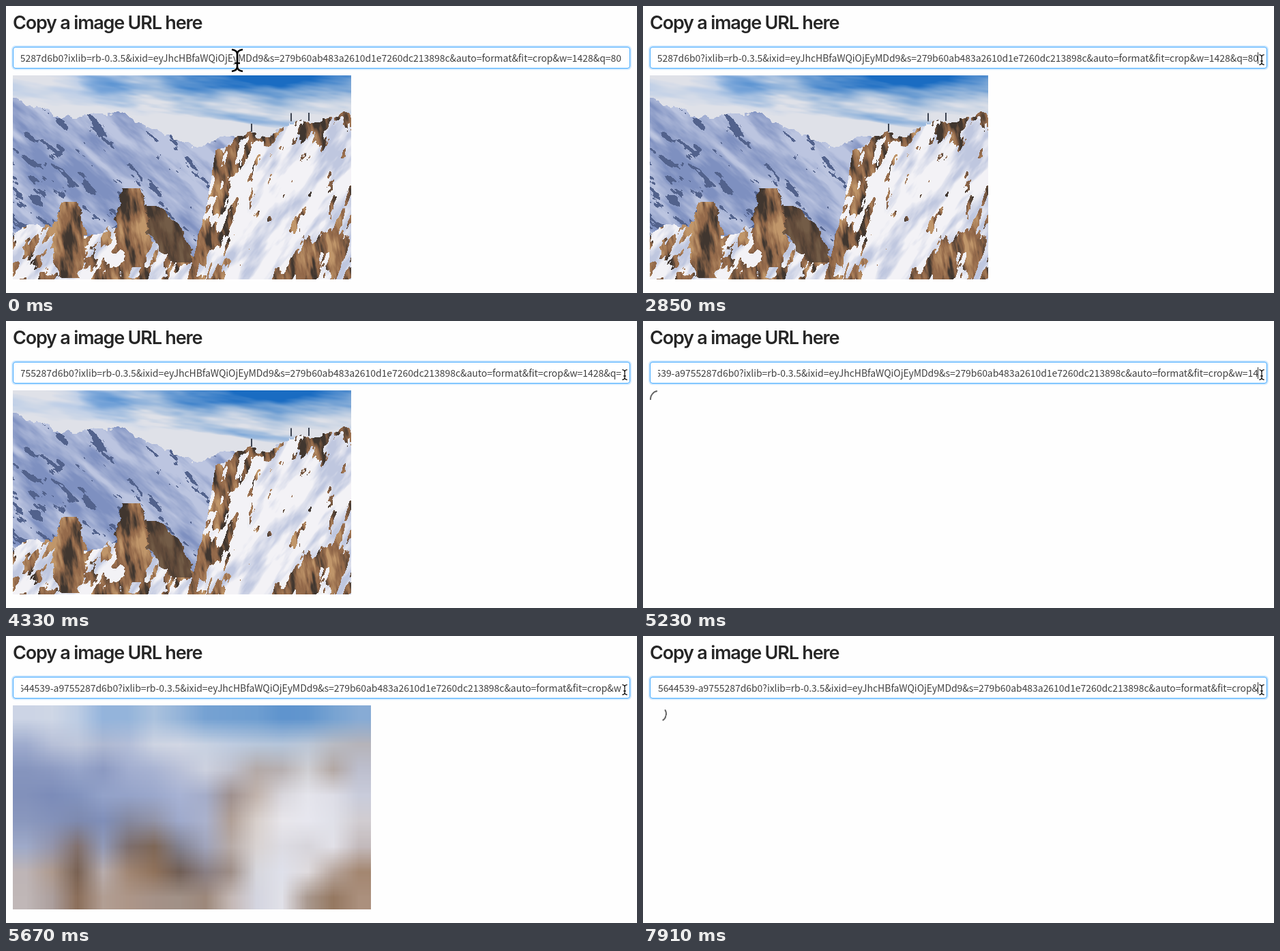
Write an HTML page with a canvas that moves like this. It is 925 by 422 pixels and loops after 8000 ms.

```html
<!DOCTYPE html>
<html lang="en">
<head>
<meta charset="utf-8">
<title>Image URL preview</title>
<style>
html, body { margin: 0; width: 100%; height: 100%; overflow: hidden; background: #fefefe; }
body > * { position: absolute; box-sizing: border-box; }
h1 { left: 10px; top: 5px; margin: 0; font: 600 27px/40px Inter, sans-serif; letter-spacing: -1.2px;
  color: rgba(0,0,0,.85); white-space: nowrap; }
#field { left: 10px; top: 60px; width: 905px; height: 32px; border: 1px solid #40a9ff; border-radius: 4px;
  background: #fff; box-shadow: 0 0 0 2px rgba(24,144,255,.2); }
#url { left: 22px; top: 60px; width: 880px; height: 32px; overflow: hidden; display: flex; justify-content: flex-end;
  font: 14px/32px "Noto Sans CJK SC", "Noto Sans CJK JP", "Noto Sans", sans-serif; letter-spacing: -.05px;
  color: rgba(0,0,0,.75); white-space: pre; }
#caret { left: 901px; top: 68px; width: 1px; height: 17px; background: #333; }
canvas { left: 10px; top: 102px; }
#spinner { left: 10px; top: 102px; width: 25px; height: 25px; border: 2px solid transparent;
  border-right-color: #666; border-radius: 50%; }
svg { left: 0; top: 0; }
</style>
</head>
<body>
<h1>Copy a image URL here</h1>
<div id="field"></div>
<div id="url"></div>
<div id="caret"></div>
<canvas id="photo" width="496" height="300"></canvas>
<canvas id="blur" width="525" height="300"></canvas>
<div id="spinner"></div>
<svg width="925" height="422" fill="none">
  <defs><path id="beam" d="M-8-16Q0-15 0-9Q0-15 8-16M0-10V10M-8 16Q0 15 0 9Q0 15 8 16M-4 4H4"/></defs>
  <g id="cursor">
    <use href="#beam" stroke="#fff" stroke-width="4.6"/>
    <use href="#beam" stroke="#000" stroke-width="2.6"/>
  </g>
</svg>
<script>
const $ = id => document.getElementById(id);
const TEXT = '5644539-a9755287d6b0?ixlib=rb-0.3.5&ixid=eyJhcHBfaWQiOjEyMDd9' +
  '&s=279b60ab483a2610d1e7260dc213898c&auto=format&fit=crop&w=1428&q=80';
const LOOP = 8000, STEP = 149.2;

const clamp = (v, lo = 0, hi = 1) => Math.min(hi, Math.max(lo, v));
const ease = (v, from, to) => {
  const u = clamp((v - from) / (to - from));
  return u * u * (3 - 2 * u);
};
const rgb = hex => [1, 3, 5].map(i => parseInt(hex.slice(i, i + 2), 16));
const mix = (a, b, f) => a.map((v, i) => v + (b[i] - v) * clamp(f));

// Value noise on a seeded lattice
let seed = 7;
const rand = () => (seed = seed * 16807 % 2147483647) / 2147483647;
const lattice = Float32Array.from({ length: 65536 }, rand);
const at = (x, y) => lattice[(x & 255) + (y & 255) * 256];

function noise(x, y) {
  const i = Math.floor(x), j = Math.floor(y), u = ease(x - i, 0, 1), v = ease(y - j, 0, 1);
  const top = at(i, j) + (at(i + 1, j) - at(i, j)) * u;
  const low = at(i, j + 1) + (at(i + 1, j + 1) - at(i, j + 1)) * u;
  return top + (low - top) * v;
}

function fbm(x, y) {
  let sum = 0;
  for (let o = 0, amp = .53; o < 4; o++, amp /= 2) sum += amp * noise(x * 2 ** o + o * 37, y * 2 ** o + o * 71);
  return sum;
}

const streak = (x, y, angle, long, wide) => {
  const c = Math.cos(angle), s = Math.sin(angle);
  return fbm((x * c + y * s) / long, (y * c - x * s) / wide);
};

const ridge = points => x => {
  const i = clamp(points.findIndex(p => p[0] > x), 1, points.length - 1);
  const [x0, y0] = points[i - 1], [x1, y1] = points[i];
  return y0 + (y1 - y0) * (x - x0) / (x1 - x0);
};
const backTop = ridge([[0, 31], [75, 64], [155, 53], [235, 92], [270, 106], [300, 92], [497, 110]]);
const nearTop = ridge([[0, 235], [30, 215], [100, 240], [150, 222], [262, 262], [497, 400]]);
const frontTop = ridge([[0, 400], [250, 320], [284, 190], [297, 112], [345, 84], [375, 92], [412, 66], [440, 70], [485, 55], [497, 62]]);

const PINNACLES = [
  { x: 83, top: 186, base: 297, half: 25, lean: 0, shade: 0 },
  { x: 173, top: 166, base: 281, half: 25, lean: 4, shade: 0 },
  { x: 203, top: 192, base: 274, half: 25, lean: 44, shade: .6 },
];
const [DARK, BROWN, TAN, SHADE, SNOW] = ['#40362f', '#93694a', '#c0966a', '#bfc7df', '#f3f2f6'].map(rgb);
const [SLOPE, PALE, CRAG, CLOUD, HAZE, BLUE] = ['#7e90c0', '#bcc5e0', '#52628c', '#dfe1e8', '#afc6e6', '#1a6cc2'].map(rgb);

function rock(x, y) {
  const v = streak(x, y, 1.4, 36, 9);
  return v < .5 ? mix(DARK, BROWN, (v - .3) / .17) : mix(BROWN, TAN, (v - .5) / .2);
}

const snow = (x, y) => mix(SHADE, SNOW, (streak(x, y, 2.2, 60, 18) - .28) / .25);

function sky(x, y) {
  const wisp = streak(x, y, .12, 130, 24);
  const blue = 1.1 - Math.hypot((x - 370) / 220, (y - 5) / 55) + (wisp - .5) * 1.6;
  return mix(mix(CLOUD, HAZE, (wisp - .35) * 3 - y / 120), BLUE, blue);
}

function slope(x, y, depth) {
  if (streak(x, y, .7, 24, 9) + clamp(depth / 140) * .13 > .72) return CRAG;
  return mix(SLOPE, PALE, (streak(x, y, .7, 60, 16) - .3) / .4 + .15 - depth / 600);
}

function front(x, y, depth) {
  const cliff = 1 - (x - 300 + (y - 110) * .22) / 58;
  const foot = (y - 300 + (x - 346) * .88) / 50;
  const crest = 1 - depth / (x > 405 ? 32 : 12);
  const bias = clamp(Math.max(cliff, foot, crest), -.2, .75);
  return streak(x, y, 1.9, 26, 9) + bias * .35 > .65 ? rock(x, y) : snow(x, y);
}

function landscape(x, y) {
  const rough = fbm(x / 10, y / 10) - .5;
  for (const p of PINNACLES) {
    const v = (y - p.top) / (p.base - p.top);
    if (v < 0 || v > 1) continue;
    const half = p.half * (.45 + .55 * Math.sin(Math.PI * v));
    if (Math.abs(x - p.x - p.lean * v + rough * 18) < half) return mix(rock(x, y), DARK, p.shade);
  }
  const shifted = y + rough * 16;
  if (shifted > frontTop(x)) return front(x, y, shifted - frontTop(x));
  if (shifted > nearTop(x)) return streak(x, y, 2.1, 20, 9) > .53 ? rock(x, y) : snow(x, y);
  if (shifted > backTop(x)) return slope(x, y, shifted - backTop(x));
  return sky(x, y);
}

function drawPhoto(canvas) {
  const c = canvas.getContext('2d'), { width, height } = canvas;
  const image = c.createImageData(width, height);
  for (let y = 0, i = 0; y < height; y++)
    for (let x = 0; x < width; x++, i += 4) image.data.set([...landscape(x, y), 255], i);
  c.putImageData(image, 0, 0);
  c.fillStyle = '#3d4350';
  for (const x of [349, 407, 433]) c.fillRect(x, frontTop(x) - 14, 2, 12);
}

// The photo shrunk to 14 pixels wide, then stretched
function drawBlur(canvas, photo) {
  const tiny = document.createElement('canvas');
  tiny.width = 14;
  tiny.height = 8;
  const small = tiny.getContext('2d'), c = canvas.getContext('2d');
  small.imageSmoothingQuality = 'high';
  small.drawImage(photo, 0, 0, 14, 8);
  c.drawImage(tiny, 0, 0, canvas.width, canvas.height);
}

const show = (id, on) => $(id).style.visibility = on ? 'visible' : 'hidden';

function render(time) {
  const k = Math.floor(time % LOOP / STEP), t = k * STEP;

  const gone = (k >= 23) + (k >= 25) + clamp(k - 30, 0, 9);
  $('url').textContent = TEXT.slice(0, TEXT.length - gone);
  show('caret', (t + 50) % 1060 >= 530);

  const photo = k < 23 || k >= 27 && k < 31, blur = k === 38;
  show('photo', photo);
  show('blur', blur);
  show('spinner', !photo && !blur);
  $('spinner').style.transform = `rotate(${(t - 3450) / 1105 * 360}deg)`;

  const across = ease(k, 1, 8), away = ease(k, 12, 17);
  const lift = Math.sin(Math.PI * ease(k, 1, 11)) ** 2;
  const x = 339 + 315 * across + 253 * away;
  const y = 80 - 4 * across + 3 * away - 15 * lift;
  $('cursor').setAttribute('transform', `translate(${x} ${y}) scale(${1 - .54 * ease(k, 17, 19)})`);
}

drawPhoto($('photo'));
drawBlur($('blur'), $('photo'));
const begin = performance.now();
(function tick() {
  render(performance.now() - begin);
  requestAnimationFrame(tick);
})();
</script>
</body>
</html>
```
